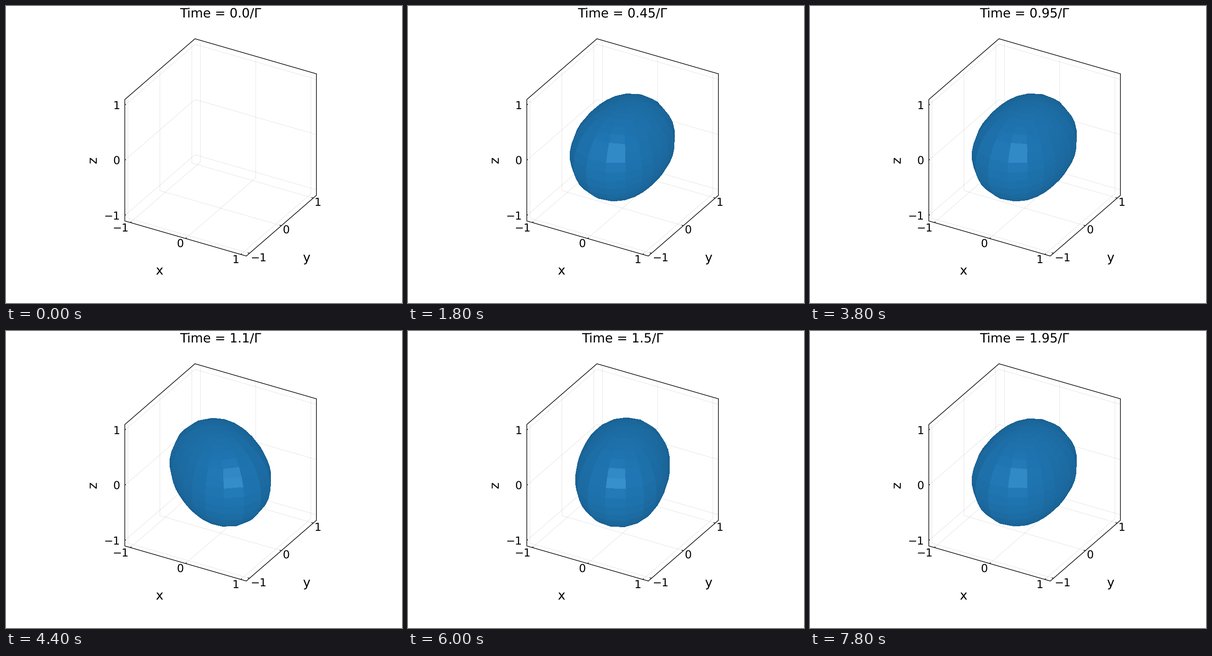
These frames come from a looping animation (864x648 px, 8000 ms). A matplotlib script:

```python
import numpy as np
import matplotlib.pyplot as plt
from matplotlib.animation import FuncAnimation
from matplotlib.collections import LineCollection, PolyCollection

W, H, DPI = 864, 648, 100
FRAMES, INTERVAL = 40, 200
SCALE, CX, CY = 139.1, 468.3, 308.5
LIM = 1.1
BASE = np.array([31, 119, 180]) / 255

plt.rcParams["font.family"] = "DejaVu Sans"
plt.rcParams["text.hinting"] = "no_hinting"

# Orthographic camera: azimuth -60 deg, elevation 30 deg
S3 = np.sqrt(3) / 2
RIGHT = np.array([S3, 0.5, 0])
UP = np.array([-0.25, S3 / 2, S3])
VIEW = np.array([S3 / 2, -0.75, 0.5])


def project(p):
    p = np.asarray(p, float)
    return np.stack([CX + SCALE * (p @ RIGHT), CY - SCALE * (p @ UP)], axis=-1)


def px(size):
    return size * 72 / DPI


fig = plt.figure(figsize=(W / DPI, H / DPI), dpi=DPI, facecolor="white")
ax = fig.add_axes([0, 0, 1, 1])
ax.set_xlim(0, W)
ax.set_ylim(H, 0)
ax.axis("off")


def lines(segments, width, alpha, z):
    ax.add_collection(LineCollection([project(s) for s in segments], colors="black",
                                     linewidths=px(width), alpha=alpha, zorder=z))


def label(x, y, text, size=27.7, **kw):
    return ax.text(x, y, text, fontsize=px(size), ha="center", zorder=5, **kw)


def draw_box():
    L, tick = LIM, 0.032
    grid, ticks = [], []
    for v in (-1, 0, 1):
        grid += [
            [(v, -L, -L), (v, L, -L), (v, L, L)],
            [(L, v, -L), (-L, v, -L), (-L, v, L)],
            [(-L, -L, v), (-L, L, v), (L, L, v)],
        ]
        ticks += [
            [(v, -L, -L), (v, -L + tick, -L)],
            [(L, v, -L), (L - tick, v, -L)],
            [(-L, -L, v), (-L, -L + tick, v)],
        ]
    lines(grid, 1, 0.1, 1)
    lines(ticks, 1.3, 1, 3)
    edge = [(-L, -L, -L), (-L, -L, L), (-L, L, L), (L, L, L), (L, L, -L), (L, -L, -L)]
    ax.add_patch(plt.Polygon(project(edge), closed=True, fill=False,
                             edgecolor="black", linewidth=px(1.4), zorder=3))


def draw_labels():
    for v in (-1, 0, 1):
        text = str(v).replace("-", "\u2212")
        wide = 10 if v < 0 else 0
        spots = [
            project((v, -LIM, -LIM)) + (-9.5 - wide, 10.5),
            project((LIM, v, -LIM)) + (12 + wide, 8.5),
            (243.3 - wide, project((-LIM, -LIM, v))[1] + 0.5),
        ]
        for x, y in spots:
            label(x - 2, y + 8.8, text, 24, va="baseline")
    label(334.5, 586.5, "x", va="baseline")
    label(655.5, 558, "y", va="baseline")
    label(190, 336, "z", rotation=90, va="center")


draw_box()
draw_labels()
title = label(468, 24, "", va="baseline")
body = PolyCollection([], antialiaseds=False, linewidths=0, zorder=4)
ax.add_collection(body)

theta, phi = np.meshgrid(np.linspace(0, np.pi, 20), np.linspace(0, 2 * np.pi, 20),
                         indexing="ij")
UNIT = np.stack([np.sin(theta) * np.cos(phi), np.sin(theta) * np.sin(phi),
                 np.cos(theta)], axis=-1)


def surface(t):
    """Radius is a quadratic form whose long axis turns about z."""
    turn = 2 * np.pi * (t - 0.2)
    flat = 1 - 0.29 * np.sin(phi - turn) ** 2
    polar = 0.79 - 0.02 * np.exp(-t / 0.2)
    r = flat * np.sin(theta) ** 2 + polar * np.cos(theta) ** 2
    return UNIT * r[..., None]


def facets(t):
    p = surface(t)
    quads = np.stack([p[:-1, :-1], p[1:, :-1], p[1:, 1:], p[:-1, 1:]], axis=2)
    quads = quads.reshape(-1, 4, 3)
    normal = np.cross(quads[:, 2] - quads[:, 0], quads[:, 3] - quads[:, 1])
    normal /= np.linalg.norm(normal, axis=1, keepdims=True)
    normal *= np.sign(np.sum(normal * quads.mean(axis=1), axis=1))[:, None]
    facing = normal @ VIEW
    seen = facing > 0
    d = facing[seen][:, None]
    color = BASE * (0.8 + 0.2 * d) + 0.11 * d ** 40
    return project(quads[seen]), np.clip(color, 0, 1)


def update(k):
    t = k / 20
    title.set_text(f"Time = {t}/\u0393")
    if k == 0:
        body.set_verts([])
    else:
        verts, colors = facets(t)
        body.set_verts(verts)
        body.set_facecolor(colors)
    return title, body


anim = FuncAnimation(fig, update, frames=FRAMES, interval=INTERVAL,
                     repeat=True, repeat_delay=0, blit=False)
plt.show()
```
